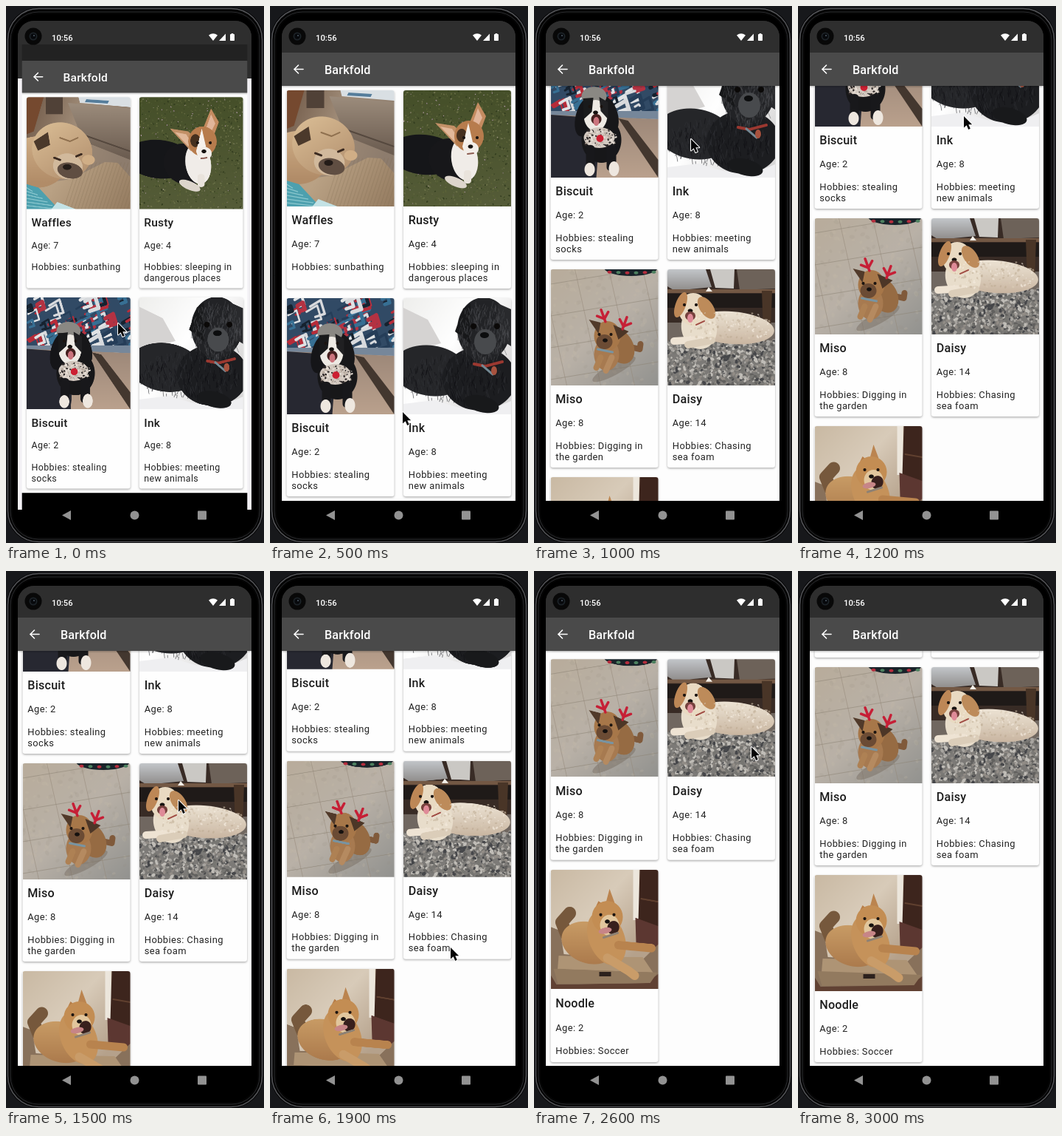
An HTML page with a canvas for the animation above (3100 ms loop, 350 px wide and 726 px high).

```html
<!DOCTYPE html>
<html lang="en">
<head>
<meta charset="utf-8">
<title>Dog list</title>
<style>
html, body { margin: 0; width: 100%; height: 100%; overflow: hidden; background: #111214; }
canvas { display: block; width: 350px; height: 726px; }
</style>
</head>
<body>
<canvas id="stage" width="350" height="726"></canvas>
<script>
const ctx = document.getElementById('stage').getContext('2d');
const LOOP = 3100, STEP = 100;
const SCREEN = { x: 16, y: 20, w: 317, h: 690 };
const PHOTO = { w: 146, h: 157 };
const ROW = 281, LIST_TOP = 114, LIST_END = 663;

// Keys: time, value...
const SCROLL = [[500, 0], [600, 0], [700, 66], [800, 171], [900, 258], [1000, 320], [1100, 362],
  [1200, 389], [1300, 404], [1500, 416], [1700, 418], [2000, 420], [2100, 466], [2200, 532], [2300, 546]];
const STRETCH = [[2200, 0], [2400, 1.25], [2500, 1.2], [2600, 1], [2700, .55], [2800, .2], [2900, 0]];
const POINTER = [[0, 152, 429], [200, 165, 490], [500, 180, 549], [600, 184, 522], [700, 189, 432],
  [800, 196, 322], [900, 204, 235], [1000, 213, 180], [1200, 225, 149], [1400, 230, 220],
  [1600, 238, 400], [1800, 244, 500], [1900, 245, 509], [2000, 249, 499], [2200, 268, 365],
  [2400, 287, 255], [2600, 295, 238], [2800, 299, 240]];
const ENTER = [[0, .964], [100, .988], [200, .998], [300, 1]];

function at(keys, t, i = 1) {
  if (t <= keys[0][0]) return keys[0][i];
  for (let k = 1; k < keys.length; k++) {
    const a = keys[k - 1], b = keys[k];
    if (t <= b[0]) return a[i] + (b[i] - a[i]) * (t - a[0]) / (b[0] - a[0]);
  }
  return keys[keys.length - 1][i];
}

function box(c, color, x, y, w, h, r = 0) {
  c.fillStyle = color;
  c.beginPath();
  c.roundRect(x, y, w, h, r);
  c.fill();
}
function oval(c, color, x, y, rx, ry = rx, turn = 0) {
  c.fillStyle = color;
  c.beginPath();
  c.ellipse(x, y, rx, ry, turn, 0, Math.PI * 2);
  c.fill();
}
function poly(c, color, ...p) {
  c.fillStyle = color;
  c.beginPath();
  for (let i = 0; i < p.length; i += 2) c.lineTo(p[i], p[i + 1]);
  c.closePath();
  c.fill();
}
function line(c, color, width, ...p) {
  c.strokeStyle = color;
  c.lineWidth = width;
  c.lineCap = c.lineJoin = 'round';
  c.beginPath();
  for (let i = 0; i < p.length; i += 2) c.lineTo(p[i], p[i + 1]);
  c.stroke();
}
function fade(c, x0, y0, x1, y1, ...colors) {
  const g = c.createLinearGradient(x0, y0, x1, y1);
  colors.forEach((color, i) => g.addColorStop(i / (colors.length - 1), color));
  return g;
}
function random(seed) {
  return () => (seed = (seed * 16807) % 2147483647) / 2147483647;
}
function speckle(c, n, x, y, w, h, size, colors) {
  const rnd = random(n * 31 + 7);
  for (let i = 0; i < n; i++) {
    const r = size * (.4 + rnd() * .6);
    oval(c, colors[i % colors.length], x + rnd() * w, y + rnd() * h, r, r * .7, rnd() * 3);
  }
}
function face(c, x, y, gap, nose) {
  oval(c, '#1b1410', x - gap, y, 2);
  oval(c, '#1b1410', x + gap, y, 2);
  oval(c, '#15110f', x, y + nose, 3.4, 2.6);
}

const scenes = {
  sleeper(c) {
    box(c, fade(c, 0, 0, 146, 60, '#6d5645', '#a08c78', '#8d7c6d'), 0, 0, 146, 157);
    poly(c, '#75492f', 0, 0, 24, 0, 10, 48, 0, 52);
    box(c, '#504137', 27, 0, 24, 24);
    poly(c, '#d9dfe3', 73, 0, 146, 0, 146, 14, 75, 8);
    poly(c, '#557d9b', 84, 3, 116, 5, 114, 9, 82, 7);
    poly(c, fade(c, 0, 10, 0, 85, '#9b8b7b', '#6b5c50'), 58, 8, 146, 16, 146, 88, 80, 62);
    line(c, '#55483e', 2, 83, 54, 146, 76);
    poly(c, fade(c, 60, 95, 146, 157, '#b9a184', '#947b60'), 0, 124, 62, 115, 110, 91, 128, 92, 146, 112, 146, 157, 0, 157);
    for (let x = 52; x < 150; x += 5) line(c, '#7e694e44', 1, x, 157, x + 21, 92);
    oval(c, fade(c, 0, 35, 0, 120, '#d8b890', '#b18c68'), 15, 91, 42, 36);
    oval(c, fade(c, 20, 35, 70, 110, '#d9bc94', '#b69472'), 50, 75, 43, 39, .4);
    poly(c, '#4b392b', 10, 62, 30, 49, 33, 67, 16, 75);
    oval(c, '#d1b99c', 58, 97, 21, 18, .2);
    oval(c, '#604e42', 61, 103, 18, 11, .2);
    oval(c, '#241c18', 57, 98, 6, 4);
    line(c, '#3b2a20', 3, 39, 85, 47, 88);
    line(c, '#3b2a20', 3, 70, 83, 77, 80);
    line(c, '#8f704f', 2, 47, 57, 61, 62, 72, 57);
    oval(c, '#d0ae86', 87, 88, 9, 7);
    poly(c, '#4da0ae', 0, 122, 17, 127, 45, 157, 0, 157);
    for (let i = 0; i < 6; i++) line(c, '#8bc8cf', 1.2, 0, 127 + i * 5, 8 + i * 7, 132 + i * 5);
    poly(c, '#c3e2e5', 35, 157, 43, 147, 69, 157);
  },
  meadow(c) {
    box(c, fade(c, 0, 0, 0, 157, '#454f29', '#555c38'), 0, 0, 146, 157);
    speckle(c, 900, 0, 0, 146, 157, 1.5, ['#343e20', '#6a7047', '#4d5830', '#5c6338']);
    speckle(c, 110, 0, 0, 146, 157, 1, ['#a48aa0', '#9c9481', '#b79eac']);
    oval(c, '#151619', 28, 87, 48, 27, .1);
    oval(c, '#17171a', 65, 94, 32, 28, .5);
    oval(c, '#f0ece8', 83, 93, 18, 29, -.15);
    oval(c, '#ddd5cc', 71, 124, 16, 6, .4);
    box(c, '#e9e3dc', 82, 108, 10, 18, 4);
    poly(c, '#c29067', 43, 44, 69, 48, 82, 62, 73, 76);
    poly(c, '#e1b89a', 50, 49, 66, 52, 73, 63, 69, 69);
    poly(c, '#c48b60', 101, 16, 112, 35, 103, 59, 87, 51);
    poly(c, '#e1b59a', 101, 24, 107, 37, 100, 51, 93, 47);
    oval(c, '#b77c4d', 89, 62, 20, 21);
    oval(c, '#45301f', 79, 61, 7, 9);
    poly(c, '#f6f1ec', 88, 44, 94, 70, 99, 82, 84, 88, 80, 76);
    oval(c, '#f2ede8', 92, 79, 10, 9);
    face(c, 91, 64, 9, 12);
    line(c, '#8b5b50', 2, 87, 86, 95, 85);
  },
  mural(c) {
    box(c, '#314a65', 0, 0, 146, 73);
    const rnd = random(83);
    const paint = ['#b72c39', '#d8dadd', '#16222f', '#376f93', '#e0e2e4', '#b43242', '#253d58'];
    for (let i = 0; i < 60; i++) {
      const x = rnd() * 146, y = rnd() * 65, s = 5 + rnd() * 10;
      line(c, paint[i % paint.length], 2 + rnd() * 4, x, y, x + s, y - s * .6, x + s * 1.4, y + s * .7, x + s * .5, y + s);
    }
    poly(c, '#76879a', 0, 67, 146, 67, 146, 78, 0, 73);
    poly(c, fade(c, 0, 75, 0, 157, '#9d8879', '#baa18d'), 0, 72, 146, 78, 146, 157, 0, 157);
    poly(c, '#272831', 0, 72, 68, 77, 62, 157, 0, 157);
    poly(c, '#43372f', 92, 77, 105, 80, 146, 133, 146, 157);
    oval(c, '#171719', 69, 106, 27, 31);
    oval(c, '#151518', 47, 75, 13, 27, .25);
    oval(c, '#171719', 77, 72, 14, 26, -.3);
    oval(c, '#8a8883', 59, 47, 17, 13);
    oval(c, '#eeeae4', 61, 73, 16, 21);
    poly(c, '#191a1b', 44, 50, 58, 49, 56, 68, 45, 78);
    poly(c, '#202022', 66, 48, 78, 55, 78, 78, 68, 67);
    face(c, 61, 61, 8, 8);
    oval(c, '#45201f', 62, 78, 7, 7);
    oval(c, '#cb747d', 62, 81, 4, 6);
    oval(c, '#d3c9c0', 66, 103, 21, 14);
    speckle(c, 100, 47, 92, 42, 23, 2, ['#e7ded5', '#b4a79b', '#2a2525']);
    box(c, '#18181b', 48, 113, 12, 33, 5);
    box(c, '#18181b', 76, 113, 13, 35, 5);
    oval(c, '#eee7df', 53, 146, 7, 9);
    oval(c, '#eee7df', 86, 145, 7, 10);
    oval(c, '#cc2032', 67, 104, 5);
  },
  shaggy(c) {
    box(c, fade(c, 0, 0, 146, 100, '#eeeeec', '#ffffff', '#d8d7d7'), 0, 0, 146, 157);
    poly(c, '#d5d3d2', 0, 13, 33, 29, 51, 61, 0, 75);
    oval(c, '#252629', 37, 98, 52, 34, .15);
    oval(c, '#1c1d20', 103, 109, 50, 43);
    oval(c, '#222326', 109, 42, 36, 43);
    poly(c, '#17181a', 81, 14, 91, 7, 91, 62, 70, 45);
    poly(c, '#292a2d', 128, 7, 146, 15, 146, 65, 126, 52);
    const rnd = random(91);
    for (let i = 0; i < 520; i++) {
      const head = i % 2, a = rnd() * 6.28, r = Math.sqrt(rnd());
      const x = (head ? 109 : 67) + Math.cos(a) * r * (head ? 36 : 73);
      const y = (head ? 44 : 107) + Math.sin(a) * r * (head ? 42 : 31);
      line(c, ['#0d0e1088', '#51535777', '#303236aa', '#77797c44'][i % 4], .9, x, y, x - 3 + rnd() * 6, y + 5 + rnd() * 4);
    }
    oval(c, '#484a4d', 111, 59, 15, 17);
    oval(c, '#0c0d0e', 110, 50, 6, 4);
    oval(c, '#0b0908', 95, 38, 4);
    oval(c, '#0b0908', 127, 38, 4);
    line(c, '#9b3830', 4, 96, 89, 111, 92, 134, 86);
    line(c, '#738994', 3, 107, 91, 121, 103);
    oval(c, '#a7523e', 123, 98, 4, 6);
    poly(c, '#efeff1', 0, 143, 42, 138, 72, 147, 110, 154, 146, 139, 146, 157, 0, 157);
    oval(c, '#18191b', 106, 143, 24, 11, .25);
  },
  tiles(c) {
    box(c, fade(c, 0, 0, 146, 157, '#b8ac9b', '#b9b1a7', '#92928f'), 0, 0, 146, 157);
    speckle(c, 180, 0, 0, 146, 157, 4, ['#c8bdac33', '#978e7f22']);
    for (let i = -1; i < 5; i++) {
      line(c, '#8d83758c', .9, 0, i * 43 + 20, 146, i * 43 - 4);
      line(c, '#9488788c', .9, i * 46 - 13, 0, i * 46 + 22, 157);
    }
    oval(c, '#19232a', 109, -3, 37, 12);
    for (let i = 0; i < 6; i++) oval(c, i % 2 ? '#4c805f' : '#b52d3d', 80 + i * 12, 5 - Math.abs(i - 2.5) * .5, 3, 2);
    oval(c, '#74695f77', 86, 135, 33, 8, -.5);
    line(c, '#805a3b', 8, 108, 105, 121, 108, 122, 101);
    oval(c, '#966b43', 94, 104, 18, 25, -.5);
    oval(c, '#a77a50', 76, 115, 17, 22);
    line(c, '#ae8154', 8, 68, 119, 62, 133);
    line(c, '#b58a60', 8, 83, 119, 75, 137);
    oval(c, '#a77749', 77, 90, 18, 20);
    poly(c, '#513a2a', 52, 68, 68, 72, 65, 87);
    poly(c, '#4c3627', 85, 75, 106, 84, 92, 95);
    oval(c, '#6b4b34', 73, 98, 11, 10);
    face(c, 74, 88, 8, 8);
    line(c, '#7894a2', 3, 64, 108, 84, 112);
    for (const [x, y, lean] of [[73, 67, -.35], [99, 77, .35]]) {
      c.save(); c.translate(x, y); c.rotate(lean);
      line(c, '#c61f36', 3.5, 0, 4, 0, -13);
      line(c, '#c61f36', 3.5, 0, 0, -8, -7);
      line(c, '#c61f36', 3.5, 0, 0, 8, -7);
      c.restore();
    }
  },
  gravel(c) {
    box(c, '#382b25', 0, 0, 146, 157);
    poly(c, fade(c, 0, 0, 0, 28, '#c2c5c9', '#908d8c'), 0, 0, 52, 0, 60, 24, 10, 29, 0, 23);
    poly(c, '#cac8c4', 58, 0, 91, 0, 90, 26, 65, 25);
    poly(c, '#6d6259', 94, 0, 146, 0, 146, 26, 98, 28);
    box(c, '#735844', 0, 27, 146, 5);
    box(c, '#1f1a18', 0, 33, 146, 19);
    box(c, '#706760', 0, 72, 146, 31);
    poly(c, '#493527', 128, 29, 142, 29, 140, 85, 130, 83);
    box(c, '#7c7a77', 0, 98, 146, 59);
    speckle(c, 900, 0, 96, 146, 61, 3.2, ['#a8a5a0', '#62615f', '#c0bdb7', '#777672', '#918c86', '#46474a']);
    oval(c, fade(c, 0, 55, 0, 104, '#eee5d6', '#c7b39e'), 87, 79, 58, 22, .08);
    oval(c, '#e8ddcb', 43, 79, 24, 29, -.2);
    line(c, '#eee3d3', 10, 44, 95, 9, 97);
    line(c, '#dbcdb9', 10, 60, 96, 28, 102);
    oval(c, '#e9dac2', 35, 54, 20, 22);
    oval(c, '#bd8756', 18, 48, 7, 18, .35);
    oval(c, '#bd8b5a', 53, 52, 9, 17, -.6);
    poly(c, '#f4f0e9', 52, 30, 56, 24, 61, 30);
    speckle(c, 160, 30, 59, 110, 35, 2, ['#f6eee399', '#b9a58c77', '#d8c9b499']);
    face(c, 31, 48, 8, 8);
    oval(c, '#76413d', 31, 63, 7, 6);
    oval(c, '#df8b98', 31, 66, 4, 6);
    line(c, '#a04b43', 2, 39, 75, 50, 70);
  },
  bed(c) {
    box(c, fade(c, 0, 0, 115, 110, '#c9b9a3', '#d8cbb9', '#b5a18b'), 0, 0, 146, 157);
    box(c, '#ece6dc', 112, 0, 8, 66);
    poly(c, '#3d251d', 121, 0, 146, 0, 146, 75, 119, 68);
    line(c, '#60402f', 2, 123, 38, 146, 42);
    poly(c, '#5c3731', 115, 63, 146, 74, 146, 112, 116, 96);
    box(c, '#604133', 0, 132, 146, 25);
    poly(c, '#88715b', 0, 75, 13, 80, 18, 111, 125, 118, 146, 98, 146, 137, 130, 149, 8, 151, 0, 138);
    poly(c, '#ae9475', 11, 113, 125, 115, 141, 138, 9, 137);
    poly(c, '#927a5f', 4, 130, 145, 135, 135, 149, 10, 150);
    box(c, '#2c211d', 66, 134, 16, 6);
    line(c, '#76583c', 17, 22, 86, 15, 69, 26, 57);
    oval(c, fade(c, 0, 70, 0, 130, '#c79a64', '#a9774a'), 52, 96, 38, 27, .3);
    oval(c, '#c5925a', 76, 90, 24, 37, -.4);
    line(c, '#c99c69', 12, 77, 116, 106, 133, 114, 139);
    line(c, '#b8834e', 11, 92, 99, 137, 103);
    poly(c, '#b67d48', 57, 57, 65, 41, 78, 51);
    poly(c, '#bb844f', 74, 47, 80, 25, 89, 49);
    oval(c, '#c38d53', 77, 62, 21, 21, -.2);
    oval(c, '#e1c69d', 80, 73, 13, 14);
    face(c, 77, 59, 9, 9);
    oval(c, '#38201d', 85, 76, 8, 9, .4);
    oval(c, '#c78587', 74, 80, 9, 4, -.2);
    line(c, '#8d8174', 3, 72, 89, 91, 83);
  }
};

const dogs = [
  ['Waffles', 7, ['sunbathing', ''], 'sleeper'],
  ['Rusty', 4, ['sleeping in', 'dangerous places'], 'meadow'],
  ['Biscuit', 2, ['stealing', 'socks'], 'mural'],
  ['Ink', 8, ['meeting', 'new animals'], 'shaggy'],
  ['Miso', 8, ['Digging in', 'the garden'], 'tiles'],
  ['Daisy', 14, ['Chasing', 'sea foam'], 'gravel'],
  ['Noodle', 2, ['Soccer'], 'bed']
].map(([name, age, hobby, scene]) => ({ name, age, hobby, photo: snapshot(scenes[scene]) }));

function snapshot(paint) {
  const canvas = document.createElement('canvas');
  canvas.width = PHOTO.w * 2;
  canvas.height = PHOTO.h * 2;
  const c = canvas.getContext('2d');
  c.scale(2, 2);
  paint(c);
  return canvas;
}

function text(str, x, y, size, color, weight = 400, spacing = 0) {
  ctx.font = `${weight} ${size}px Roboto, sans-serif`;
  ctx.letterSpacing = spacing + 'px';
  ctx.fillStyle = color;
  ctx.fillText(str, x, y);
}

function drawCard(dog, x, y, h, stretch) {
  ctx.save();
  ctx.translate(x, y);
  ctx.scale(1, stretch);
  ctx.shadowColor = '#0005';
  ctx.shadowBlur = 3;
  ctx.shadowOffsetY = 1.2;
  box(ctx, '#fefefe', 0, 0, PHOTO.w, h, 3.2);
  ctx.shadowColor = 'transparent';
  ctx.save();
  ctx.beginPath();
  ctx.roundRect(0, 0, PHOTO.w, PHOTO.h, [3.2, 3.2, 0, 0]);
  ctx.clip();
  ctx.drawImage(dog.photo, 0, 0, PHOTO.w, PHOTO.h);
  ctx.restore();
  text(dog.name, 6.8, 181, 16.13, '#1d1d1d', 500, .2);
  const body = (str, base) => text(str, 6.8, base, 12.9, '#222', 400, .4);
  body('Age: ' + dog.age, 212);
  body('Hobbies: ' + dog.hobby[0], 242.5);
  if (dog.hobby[1]) body(dog.hobby[1], 257.7);
  ctx.restore();
}

function drawList(scroll, pull) {
  const warp = y => {
    const d = LIST_END - y;
    return LIST_END - d * (1 + .0344 * pull * (1 - d / 1300));
  };
  dogs.forEach((dog, i) => {
    const h = i === 6 ? 253 : 268;
    const y = LIST_TOP + Math.floor(i / 2) * ROW - scroll;
    if (y > 675 || y + h < 100) return;
    const top = warp(y);
    drawCard(dog, i % 2 ? 181 : 22.5, top, h, (warp(y + h) - top) / h);
  });
}

function drawWindow(t) {
  const s = at(ENTER, t);
  ctx.save();
  ctx.beginPath();
  ctx.roundRect(SCREEN.x, SCREEN.y, SCREEN.w, SCREEN.h, 22);
  ctx.clip();
  box(ctx, '#2d2d2d', 16, 20, 317, 78);
  box(ctx, '#f3f1f5', 16, 98, 317, 583);
  box(ctx, '#000', 16, 681, 317, 40);
  ctx.translate(174.5, 370);
  ctx.scale(s, s);
  ctx.translate(-174.5, -370);
  box(ctx, s < 1 ? '#222' : '#2e2e2e', 16, 40, 317, 24);
  box(ctx, '#fdfdfd', 16, 107, 317, 562);
  ctx.save();
  ctx.beginPath();
  ctx.rect(16, 108, 317, 561);
  ctx.clip();
  drawList(at(SCROLL, t), at(STRETCH, t));
  box(ctx, fade(ctx, 0, 108, 0, 111, '#0003', '#0000'), 16, 108, 317, 3);
  ctx.restore();
  box(ctx, '#4a4a4a', 16, 63, 317, 45);
  line(ctx, '#fff', 1.6, 45, 85.5, 33, 85.5);
  line(ctx, '#fff', 1.6, 38.5, 80, 33, 85.5, 38.5, 91);
  text('Barkfold', 74, 91.7, 16.13, '#fff', 500, .2);
  box(ctx, '#000', 16, 669, 317, 42);
  ctx.restore();
}

function drawPhone() {
  box(ctx, '#17181b', 0, 0, 350, 726);
  box(ctx, '#050505', 1, 2, 348, 724, 43);
  ctx.lineWidth = 1.5;
  ctx.strokeStyle = '#55565a';
  ctx.beginPath();
  ctx.roundRect(2.5, 3.5, 345, 721, 42);
  ctx.stroke();
  ctx.lineWidth = 1;
  ctx.strokeStyle = '#2b2c2f';
  ctx.beginPath();
  ctx.roundRect(6, 8, 338, 713, 38);
  ctx.stroke();
  box(ctx, '#000', 9, 11, 332, 707, 34);
}

function drawSystemBars() {
  ctx.save();
  ctx.beginPath();
  ctx.roundRect(SCREEN.x, SCREEN.y, SCREEN.w, 60, 22);
  ctx.clip();
  box(ctx, '#2e2e2e', 16, 20, 317, 31);
  ctx.restore();
  oval(ctx, '#080808', 37, 41, 11.5);
  oval(ctx, '#1d2328', 37, 41, 5.5);
  oval(ctx, '#07090c', 37, 41, 3.7);
  oval(ctx, '#4a5661', 38, 40, 1.1);
  text('10:56', 62, 46.7, 11.3, '#fff', 500);
  ctx.fillStyle = '#fff';
  ctx.beginPath();
  ctx.moveTo(281, 47);
  ctx.lineTo(275, 39.5);
  ctx.quadraticCurveTo(281, 35, 287, 39.5);
  ctx.fill();
  poly(ctx, '#fff', 289, 47, 298, 47, 298, 37.5);
  box(ctx, '#fff', 304, 38, 6, 9, .8);
  box(ctx, '#fff', 305.7, 37, 2.6, 2);
  poly(ctx, '#929292', 76, 688.5, 88, 682, 88, 695);
  oval(ctx, '#929292', 174.5, 688.5, 6);
  box(ctx, '#929292', 260, 682.5, 12, 12, 1);
}

function drawPointer(x, y) {
  ctx.save();
  ctx.translate(x, y);
  const arrow = [0, 0, 0, 15.5, 3.7, 12.2, 6.2, 18, 8.8, 16.8, 6.3, 11.2, 11.2, 11.2];
  line(ctx, '#fff', 2, ...arrow, 0, 0);
  poly(ctx, '#050505', ...arrow);
  ctx.restore();
}

function draw(now) {
  const t = Math.floor((now % LOOP) / STEP) * STEP;
  drawPhone();
  drawWindow(t);
  drawSystemBars();
  if (t < 2900) drawPointer(at(POINTER, t), at(POINTER, t, 2));
}

let start;
function tick(now) {
  start ??= now;
  draw(now - start);
  requestAnimationFrame(tick);
}
requestAnimationFrame(tick);
</script>
</body>
</html>
```
